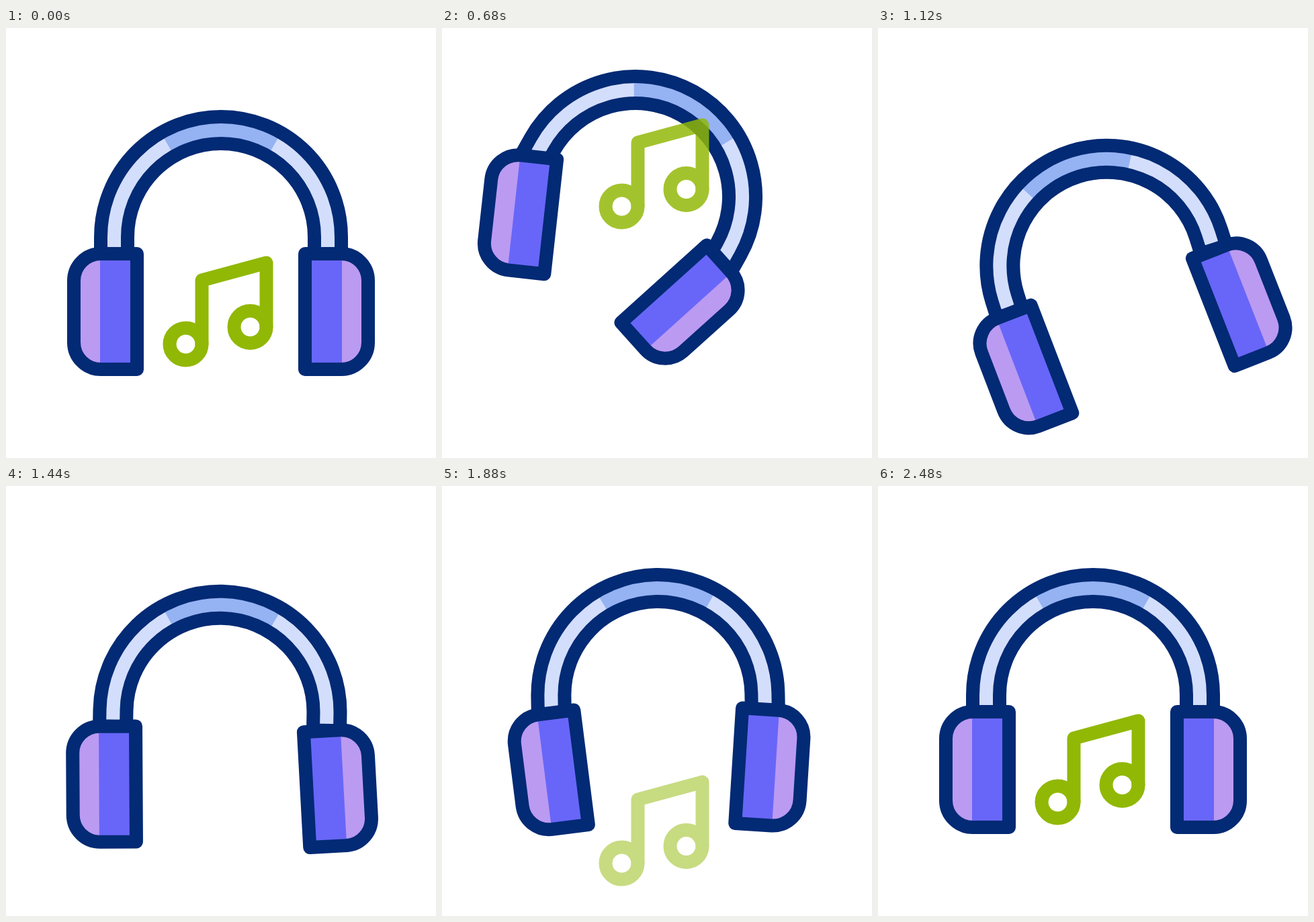
An HTML page for the animation above (2.84 s loop, 640 px wide and 640 px high).

```html
<!DOCTYPE html>
<html lang="en">
<head>
<meta charset="utf-8">
<title>Headphones</title>
<style>
  html, body { margin: 0; width: 100%; height: 100%; overflow: hidden; background: #fff; }
  svg { display: block; width: 100%; height: 100%; }
  .line, .tune { fill: none; stroke-width: 20; stroke-linejoin: round; }
  .line { stroke: #032a74; }
  .tune { stroke: #91b805; stroke-linecap: round; }
  .band { fill: none; stroke-width: 40; }
</style>
</head>
<body>
<svg viewBox="0 0 640 640">
  <defs>
    <path id="shell" d="M195 336H141a40 40 0 0 0-40 40v92a40 40 0 0 0 40 40h54z"/>
    <g id="cup">
      <use href="#shell" fill="#bb9af2"/>
      <path fill="#6866f8" d="M140 336h55v172h-55z"/>
      <use href="#shell" class="line"/>
    </g>
  </defs>
  <g id="phones">
    <path class="band" stroke="#d3defc" d="M161 336V311a159 159 0 0 1 318 0v25"/>
    <path class="band" stroke="#95b2f3" d="M240.5 173.3a159 159 0 0 1 159 0"/>
    <path class="line" d="M141 336V311a179 179 0 0 1 358 0v25h-40V311a139 139 0 0 0-278 0v25z"/>
    <use id="left" href="#cup"/>
    <g id="right"><use href="#cup" transform="matrix(-1 0 0 1 640 0)"/></g>
  </g>
  <g id="note" class="tune">
    <circle cx="267.5" cy="470.5" r="24"/>
    <circle cx="363.5" cy="445" r="24"/>
    <path d="M291.5 470.5V375.5L387.5 349.5V445"/>
  </g>
</svg>
<script>
const LOOP = 2840, STEP = 40, END = 2480;
const HIGH = 680, LOW = 1180; // times of the two extreme poses

const el = id => document.getElementById(id);
const phones = el('phones'), left = el('left'), right = el('right'), note = el('note');

const ramp = (t, from, to) => Math.min(1, Math.max(0, (t - from) / (to - from)));

// Eased change of a value by a given amount.
function move(t, from, to, by) {
  const u = ramp(t, from, to);
  return by * u * u * (3 - 2 * u);
}

// Rest -> high pose -> low pose -> rest.
const swing = (t, start, high, low, stop) =>
  move(t, start, HIGH, high) + move(t, HIGH, LOW, low - high) + move(t, LOW, stop, -low);

// Oscillation that dies out at END.
function wobble(t, start, size, period) {
  const u = ramp(t, start, END);
  return size * (1 - u * u) * Math.sin(2 * Math.PI * u * (END - start) / period);
}

function draw(t) {
  const sway = wobble(t, 1320, 1.3, 760);
  const x = swing(t, 0, -32, 22.5, 1440) - 1.4 * sway;
  const y = swing(t, 40, -60, 47, 1720);
  const turn = swing(t, 0, 29.2, -19.4, 1440) + sway;
  const leftTurn = move(t, 0, 480, 10.7) + move(t, 530, LOW, -32.5)
    + move(t, LOW, 1460, 21.8) + wobble(t, 1440, 8.8, 580);
  const rightTurn = swing(t, 70, 48, -24.3, 1515) + wobble(t, 1440, 8, 1080);

  phones.setAttribute('transform', `translate(${x} ${y}) rotate(${turn} 320 311)`);
  left.setAttribute('transform', `rotate(${leftTurn - turn} 152 338)`);
  right.setAttribute('transform', `rotate(${rightTurn - turn} 488 338)`);

  // The note leaves upwards and comes back from below.
  const back = t > LOW;
  const rise = back ? 103 + move(t, 1740, 2400, -103) : move(t, 0, 610, -205);
  note.setAttribute('transform', `translate(0 ${rise})`);
  note.setAttribute('opacity', back ? ramp(t, 1760, 2000) : 1 - ramp(t, 640, 880));
}

const start = performance.now();
function tick() {
  const t = (performance.now() - start) % LOOP;
  draw(Math.min(END, Math.floor(t / STEP) * STEP));
  requestAnimationFrame(tick);
}
tick();
</script>
</body>
</html>
```
